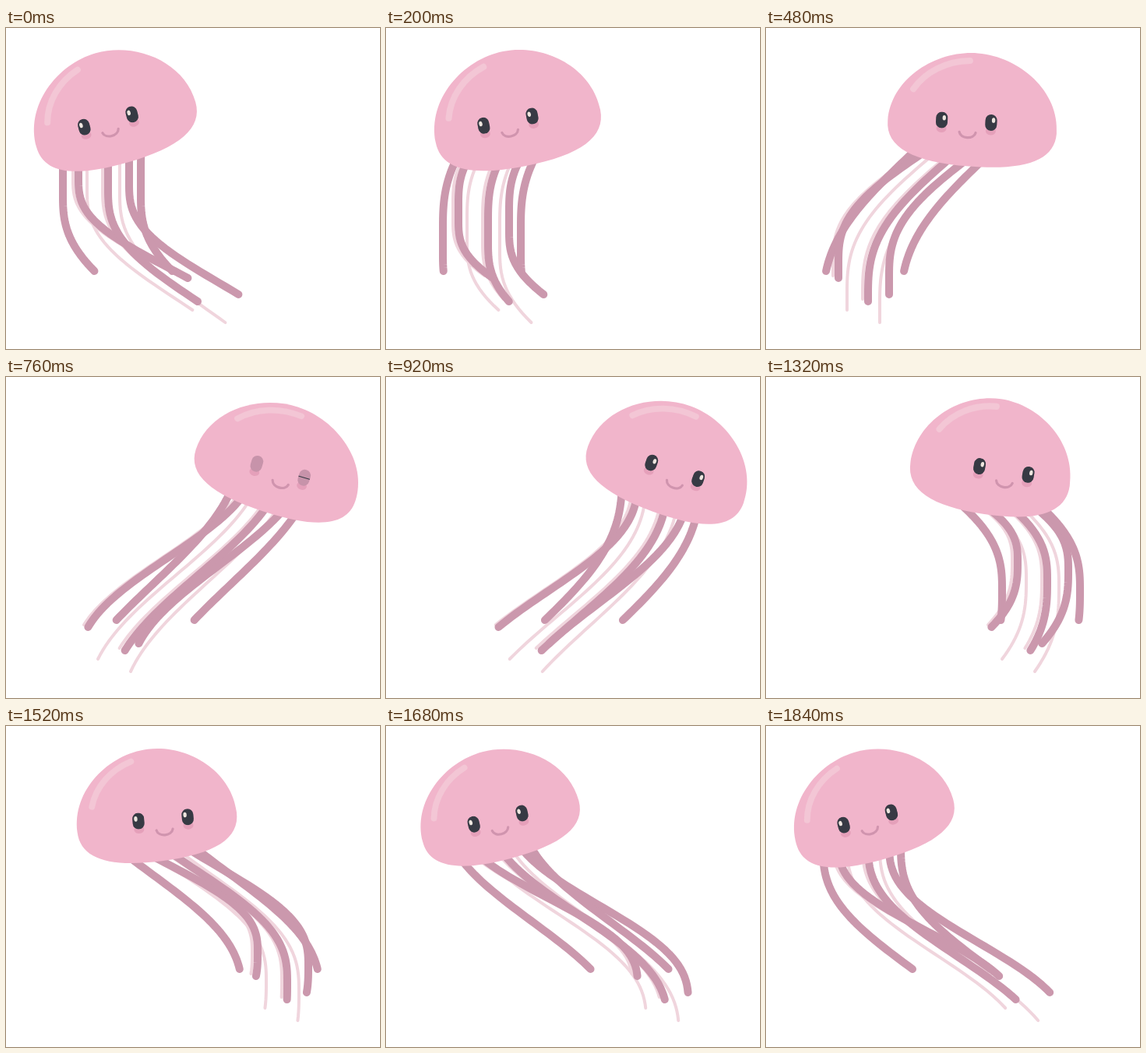
Recreate the animation shown at these times as an HTML page with a canvas. Size 480 px wide and 412 px high, loop 1.88 s.

```html
<!DOCTYPE html>
<html lang="en">
<head>
<meta charset="utf-8">
<title>Jellyfish</title>
<style>
  html, body { margin: 0; width: 100%; height: 100%; overflow: hidden; background: #fff; }
  canvas { display: block; }
</style>
</head>
<body>
<canvas id="stage" width="480" height="412"></canvas>
<script>
const ctx = document.getElementById('stage').getContext('2d');
const LOOP = 1880;   // the swim cycle is cut slightly short before it repeats
const CYCLE = 2000;
const STEP = 40;
const ROOT = 145;    // height where the tentacles start to trail

// Tentacles hang from an offset to the body and end at a height; lag is the tip's delay in ms
const thin = [
  { offset: -49, end: 318, lag: 640 },
  { offset: -31, end: 362, lag: 640 },
  { offset: -11, end: 348, lag: 600 },
  { offset: 11, end: 378, lag: 640 }
];
const thick = [
  { offset: -62, end: 312, lag: 440 },
  { offset: -42, end: 321, lag: 650 },
  { offset: -4, end: 351, lag: 600 },
  { offset: 23, end: 342, lag: 650 },
  { offset: 38, end: 312, lag: 440 }
];

const rad = deg => deg * Math.PI / 180;
const wave = (t, peak, period) => Math.cos(2 * Math.PI * (t - peak) / period);

function ease(u) {
  u = Math.max(0, Math.min(1, u));
  return u * u * u * (10 - 15 * u + 6 * u * u);
}

// Side-to-side swim: a slower glide right, a faster one left, a short rest
function swim(t) {
  const phase = (t + 100 + CYCLE) % CYCLE;
  return 135 + 230 * (ease(phase / 1080) - ease((phase - 1080) / 840));
}

function placed(x, y, deg, draw) {
  ctx.save();
  ctx.translate(x, y);
  ctx.rotate(rad(deg));
  draw();
  ctx.restore();
}

function stroke(color, width) {
  ctx.strokeStyle = color;
  ctx.lineWidth = width;
  ctx.stroke();
}

function oval(x, y, rx, ry, color) {
  ctx.fillStyle = color;
  ctx.beginPath();
  ctx.ellipse(x, y, rx, ry, 0, 0, 7);
  ctx.fill();
}

// Each point repeats the body's path, later the further down it is
function tentacle({ offset, end, lag }, t, color, width) {
  const parts = 40;
  ctx.beginPath();
  for (let i = 0; i <= parts; i++) {
    const s = i / parts;
    ctx.lineTo(swim(t - lag * s) + offset, ROOT + (end - ROOT) * s);
  }
  stroke(color, width);
}

function drawBell(t) {
  const x = swim(t), tilt = 2 + .158 * (x - 250);
  placed(x, 108.7 + 2 * wave(t, 650, CYCLE), tilt, () => {
    ctx.scale(1.003 + .027 * wave(t, 470, CYCLE), .99 + .03 * wave(t, 230, CYCLE / 2));
    ctx.fillStyle = '#f1b5cb';
    ctx.beginPath();
    ctx.moveTo(-105.5, 17);
    ctx.bezierCurveTo(-105.5, -38, -52, -79, 0, -79);
    ctx.bezierCurveTo(52, -79, 105.5, -38, 105.5, 17);
    ctx.bezierCurveTo(105.5, 52, 70, 68, 0, 68);
    ctx.bezierCurveTo(-70, 68, -105.5, 52, -105.5, 17);
    ctx.fill();
    const start = 180 + Math.max(14, 23 + .85 * tilt);
    ctx.beginPath();
    ctx.ellipse(0, 9, 86, 78, 0, rad(start), rad(start + 57));
    stroke('#f3c6d5', 8);
  });
}

function drawEye(x, open, glint) {
  oval(x, 11, 6.5, 5, '#e5a0ba');
  ctx.beginPath();
  ctx.roundRect(x - 7.5, -10.5, 15, 21, 7.5);
  ctx.fillStyle = '#c793aa';
  ctx.fill();
  ctx.save();
  ctx.clip();
  ctx.fillStyle = '#373a44';
  ctx.fillRect(x - 8, -10.5 * open, 16, 21 * open);
  if (open > .3) oval(x + glint, -3, 2.2, 3.3, '#eee6df');
  ctx.restore();
}

function drawFace(t) {
  const x = 251 + 1.05 * (swim(t - 25) - 250);
  const tilt = 2.3 + .141 * (x - 252);
  const y = 119.6 + .04 * tilt;
  const open = Math.min(1, Math.abs(t - 760) / 120);
  const glint = 3.3 * Math.tanh(tilt / 2);
  placed(x, y, tilt, () => {
    drawEye(-31.7, open, glint);
    drawEye(31.7, Math.max(open, .05), glint);
  });
  placed(x + 1.6 - .1 * tilt, y + 14 + .07 * tilt, tilt, () => {
    ctx.beginPath();
    ctx.moveTo(-10.5, 0);
    ctx.bezierCurveTo(-8.5, 9, 8.5, 9, 10.5, 0);
    stroke('#d094ae', 3.2);
  });
}

function frame() {
  const t = Math.floor((performance.now() - began) % LOOP / STEP) * STEP;
  ctx.clearRect(0, 0, 480, 412);
  ctx.lineCap = ctx.lineJoin = 'round';
  thin.forEach(part => tentacle(part, t, '#f0d5dd', 4));
  thick.forEach(part => tentacle(part, t, '#cb98ad', 10));
  drawBell(t);
  drawFace(t);
  requestAnimationFrame(frame);
}

const began = performance.now();
frame();
</script>
</body>
</html>
```
